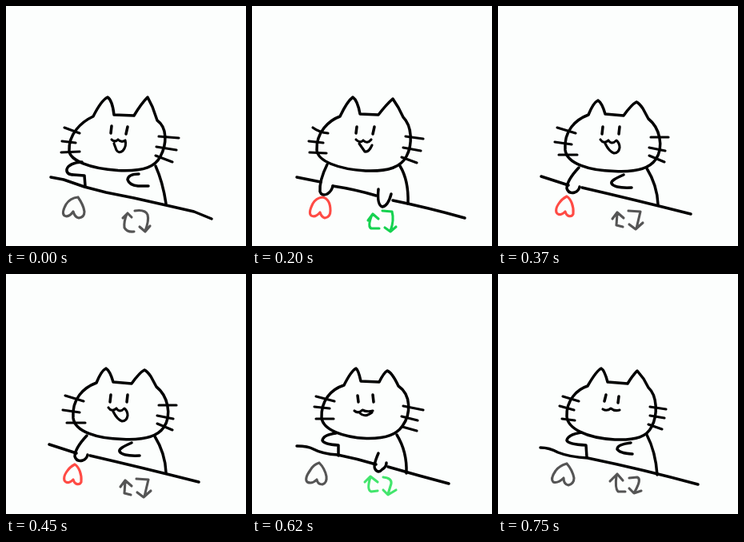
Write an HTML page that moves like this. It is 300 by 300 pixels and loops after 870 ms.

```html
<!DOCTYPE html>
<html lang="en">
<head>
<meta charset="utf-8">
<title>Cat at the counter</title>
<style>
html, body { margin: 0; width: 100%; height: 100%; overflow: hidden; background: #fcfefd; }
svg { display: block; width: 100vw; height: 100vh; }
path { fill: none; stroke: #000; stroke-width: 3.5; stroke-linecap: round; stroke-linejoin: round; }
.thin { stroke-width: 3.1; }
.icon { stroke: #555; stroke-width: 3.1; }
.liked { stroke: #ff4b45; }
.shared { stroke: #16d250; }
.shared.pale { stroke: #42e56c; }
g { visibility: hidden; animation: short 870ms step-end var(--at) infinite; }
g.long { animation-name: long; }
@keyframes short { 0% { visibility: visible; } 13.7931%, 100% { visibility: hidden; } }
@keyframes long { 0% { visibility: visible; } 14.9425%, 100% { visibility: hidden; } }
</style>
</head>
<body>
<svg viewBox="0 0 300 300">

<g style="--at: 0ms">
  <path d="M109 138C94 145 78 160 79 181C80 193 104 203 140 205.5C174 207 187 200 193 188C201 173 202 152 189 143L183 126L177 114Q169 122 160 137L135 136Q133 118 127 114Q119 118 109 138"/>
  <path d="M132 150L131 159M152 151L150 160"/>
  <path class="thin" d="M132 167Q136 171 140 167Q144 171 149 168Q151 175 146 181Q141 185 138 180L135 172"/>
  <path class="thin" d="M73 152L92 159M70 169L87 171M69 183L92 182M191 163L216 165M188 176L213 180M187 187L208 195"/>
  <path d="M56 214L72 217L98 226L125 233L160 240L200 249L235 257L257 266"/>
  <path d="M95 195Q79 196 76 204Q75 211 85 211L98 212L99 225M166 210Q153 210 152 217Q154 224 165 225L178 225M187 200Q196 220 200 247"/>
  <path class="icon" d="M90 239Q80 240 75 248Q69 259 73 262Q78 265 84 257Q86 264 91 265Q98 264 98 257Q97 249 90 239"/>
  <path class="icon" d="M146 265L152 259L157 264M151 260Q147 270 148 277Q151 283 160 282M161 256Q174 254 177 261Q179 268 174 281M167 276L174 282L180 275"/>
</g>

<g class="long" style="--at: -750ms">
  <path d="M110 138C96 143 80 158 81 180C82 194 108 204 142 206C172 207 186 201 193 188C201 173 200 150 189 139L183 127L176 116Q168 123 158 136L135 135Q132 118 126 114Q119 119 110 138"/>
  <path d="M131 151L130 159M153 151L151 160"/>
  <path class="thin" d="M130 167Q135 172 139 168Q144 173 149 167M134 172L141 182Q146 183 150 174"/>
  <path class="thin" d="M76 152Q84 158 95 159M71 169L89 171M72 183L93 184M192 163L214 166M189 177L211 181M187 189L206 196"/>
  <path d="M56 214L86 220M101 225Q128 229 155 237M176 243Q220 252 266 265"/>
  <path d="M94 198Q84 218 85 232Q87 238 94 235Q100 231 101 225M158 229Q156 249 163 251Q170 250 174 235M185 200Q196 218 195 247"/>
  <path class="icon liked" d="M88 239Q80 240 76 247Q70 259 74 262Q79 265 85 258Q87 264 91 265Q98 264 98 256Q98 241 88 239"/>
  <path class="icon shared" d="M145 268L151 260L158 266M150 261Q144 276 149 278L159 278M163 256L175 257Q178 268 173 281M166 277L173 282L180 276"/>
</g>

<g style="--at: -620ms">
  <path d="M111 137C95 145 80 157 81 180C82 194 108 205 144 207C174 208 188 202 195 190C206 173 200 150 187 140L181 127L175 118Q167 124 158 137L135 135Q131 119 125 115Q119 119 111 137"/>
  <path d="M131 152L130 160M153 151L151 160"/>
  <path class="thin" d="M128 167Q131 173 137 167Q141 174 146 168Q151 171 151 177Q150 184 144 183Q139 181 134 171"/>
  <path class="thin" d="M73 153L96 158M71 170L91 170M72 183L95 184M191 165L216 166M188 177L210 180M188 187L207 195"/>
  <path d="M56 214Q76 223 110 228Q180 243 262 262"/>
  <path d="M98 198Q82 203 80 209Q81 216 103 215L102 226M158 213Q142 216 142 222Q146 228 167 226M185 203Q195 218 197 245"/>
  <path class="icon" d="M86 239Q78 241 75 247Q69 258 72 261Q77 263 82 257Q83 263 89 263Q95 262 94 255Q92 245 86 239"/>
  <path class="icon" d="M143 264L149 258L157 264M149 259L149 270Q149 276 157 276M165 258L176 258L173 280M167 275L172 281L179 276"/>
</g>

<g class="long" style="--at: -500ms">
  <path d="M113 136C97 142 82 156 84 180C86 197 114 206 146 206.5C176 208 190 202 197 192C208 176 202 152 188 141L181 128Q176 121 173 120Q167 123 157 137L134 135Q130 121 125 118Q119 121 113 136"/>
  <path d="M131 151L130 160M152 151L151 160"/>
  <path class="thin" d="M128 167Q132 173 138 168Q142 174 148 168Q152 171 152 177Q151 184 145 184Q139 182 134 172"/>
  <path class="thin" d="M74 152L97 159M71 170L92 173M76 186L99 186M191 164L213 164M189 177L209 181M189 187L208 195"/>
  <path d="M54 213L88 224M105 227Q170 242 241 260"/>
  <path d="M101 202Q86 218 86 228Q88 235 96 233Q101 231 102 226M157 211Q140 218 142 222Q146 228 167 227M186 203Q199 224 200 248"/>
  <path class="icon liked" d="M86 238C78 242 71 252 73 258C76 263 81 260 84 257C86 264 92 264 94 260C95 250 91 241 86 238"/>
  <path class="icon" d="M143 266L149 258L157 265M149 259L148 274L156 276M163 256L178 257L173 278M164 273L172 279L181 271"/>
</g>

<g style="--at: -370ms">
  <path d="M113 136C99 143 85 160 86 183C88 195 110 206 143 208C172 208 185 203 191 193C200 178 199 153 185 143L185 141L172 121L157 136L134 134Q131 120 127 118Q121 122 113 136"/>
  <path d="M132 151L131 159M152 152L151 160"/>
  <path class="thin" d="M129 168Q133 173 139 168Q143 172 146 170L153 170Q154 178 150 183Q144 185 141 179L135 172"/>
  <path class="thin" d="M78 156L99 162M76 171L95 173M77 188L100 187M186 161L210 165M187 173L209 180M186 187L206 193"/>
  <path d="M57 213L73 216L107 225L150 236L196 249L243 261"/>
  <path d="M103 199Q87 201 86 208Q88 213 99 213L107 216L106 224M158 214Q140 219 141 224Q145 230 164 229M186 203Q197 222 196 249"/>
  <path class="icon" d="M86 238Q79 239 75 244Q67 254 70 258Q75 260 82 254Q82 261 88 262Q94 261 93 253Q91 245 86 238"/>
  <path class="icon" d="M144 262L151 255L157 259M150 256Q145 270 148 273L159 272M162 257L174 257Q178 261 172 275M166 270L172 276L178 270"/>
</g>

<g class="long" style="--at: -250ms">
  <path d="M115 139C99 144 86 158 87 180C89 195 114 204 143 205.5C169 206 181 200 188 190C199 175 199 151 183 140Q175 123 169 121Q165 123 159 135L136 134Q133 120 130 118Q124 121 115 139"/>
  <path d="M132 152L133 160M151 151L152 160"/>
  <path class="thin" d="M128 171Q133 175 138 170Q144 173 151 171M135 174Q141 180 150 173"/>
  <path class="thin" d="M80 153L103 159M78 166L97 168M80 181L102 181M189 165L214 170M187 178L207 183M188 191L206 196"/>
  <path d="M56 215Q70 215 77 219Q88 225 107 226Q132 231 155 238M170 241Q208 252 246 262"/>
  <path d="M105 199Q89 201 88 208Q90 213 108 214L108 227M158 224Q151 240 154 244Q158 250 163 244Q168 241 168 236M181 201Q194 222 193 249"/>
  <path class="icon" d="M84 236Q77 238 73 245Q65 256 69 260Q75 263 81 257Q82 263 88 263Q94 261 93 253Q91 243 84 236"/>
  <path class="icon shared pale" d="M141 260L148 253L157 260M148 254Q143 270 149 272L157 271M164 254Q175 255 174 262L170 275M164 270L170 276L180 270"/>
</g>

<g style="--at: -120ms">
  <path d="M112 140C99 144 85 158 86 178C87 193 110 205 146 207C174 208 186 203 192 191C200 176 199 152 188 142L182 131L174 121Q168 127 162 137L137 135Q133 120 129 118Q123 121 112 140"/>
  <path d="M135 151L133 159M151 153L150 161"/>
  <path class="thin" d="M131 169Q136 172 141 168Q146 172 152 170"/>
  <path class="thin" d="M81 153L101 159M77 165L95 170M80 181L96 183M190 166L210 169M190 177L208 180M188 188L205 194"/>
  <path d="M53 217Q64 217 75 223Q90 229 112 230Q180 244 250 263"/>
  <path d="M104 198Q87 201 86 208Q88 213 110 214L111 229M166 211Q149 213 149 219Q152 224 168 225M186 201Q197 222 199 251"/>
  <path class="icon" d="M86 237Q76 240 72 246Q65 256 69 260Q75 262 82 255Q82 263 88 264Q95 262 95 255Q93 245 86 237"/>
  <path class="icon" d="M140 259L149 250L156 258M148 252Q146 268 150 272L159 272M164 255L174 254Q180 256 171 272M164 268L170 274L179 271"/>
</g>

</svg>
</body>
</html>
```
